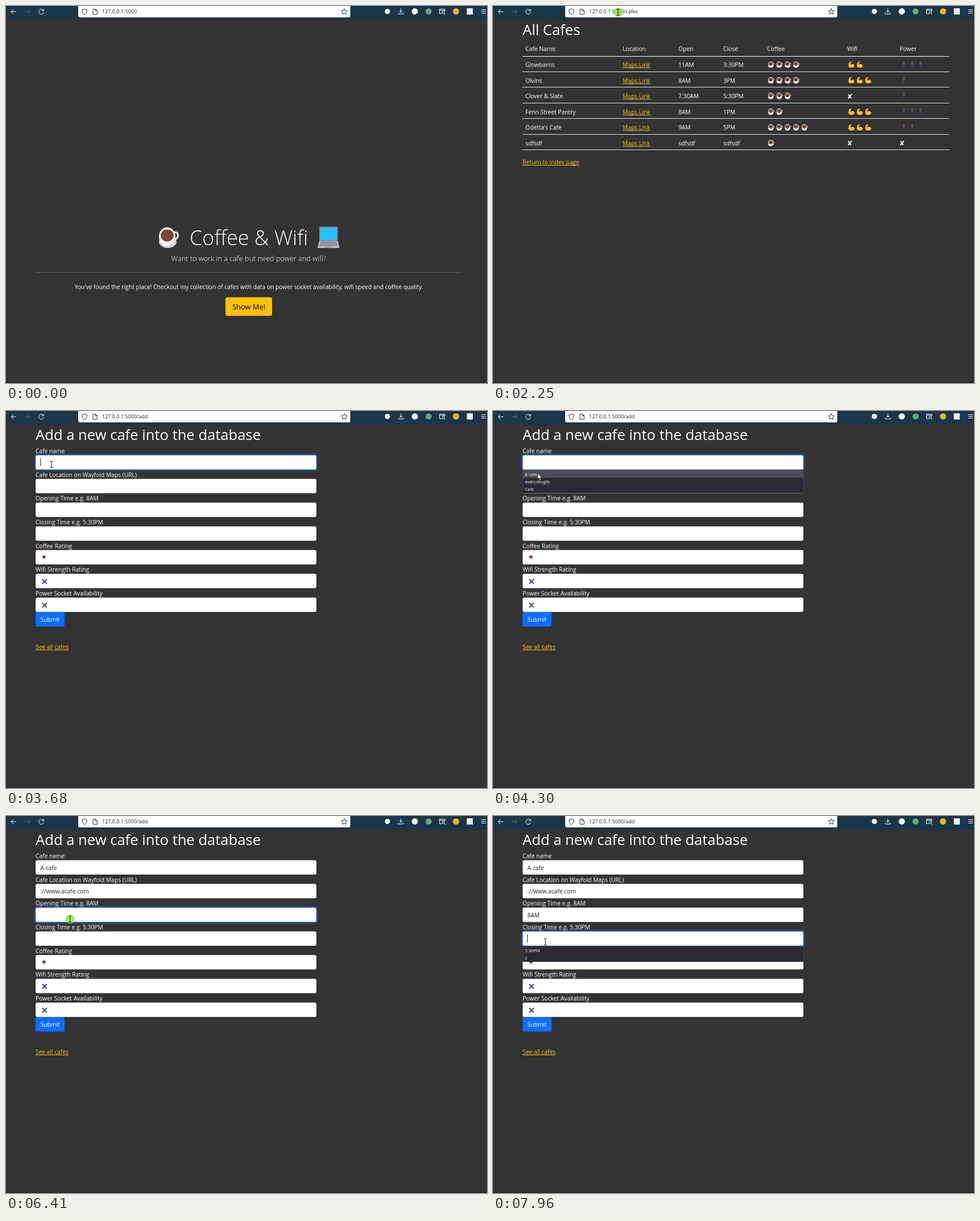
Write an HTML page with a canvas that moves like this. It is 846 px wide and 662 px high and loops after 8000 ms.

```html
<!DOCTYPE html>
<html lang="en">
<head>
<meta charset="utf-8">
<title>Coffee &amp; Wifi</title>
<style>
html, body { margin: 0; overflow: hidden; background: #333; }
canvas { display: block; }
</style>
</head>
<body>
<canvas id="stage" width="846" height="662"></canvas>
<script>
const ctx = document.getElementById('stage').getContext('2d');
const LOOP = 8000, BODY = 10.25, GOLD = '#ffc107';
const ITEM = 13.4, FIELD_HEIGHT = 25.5;
const PRESS = 80, HALO = 150, BLINK = 500;
const CAFES_AT = 870, ADD_AT = 2380;

// Each pointer move eases from the last place: start, end, x, y
const MOVES = [
  [190, 720, 451, 540],
  [1140, 1910, 292, 16],
  [1910, 2140, 220, 11],
  [3050, 3480, 80, 94],
  [3960, 4240, 78.5, 109.5],
  [4970, 5030, 82, 130],
  [5190, 5330, 101, 173],
  [5940, 6140, 113, 181],
  [6340, 7050, 98.5, 191.5],
  [7170, 7500, 92, 221]
];
// focus, open and pick are the times of clicks
const FIELDS = [
  { label: 'Cafe name', value: 'A cafe', focus: 3500, open: 3960, pick: 4500,
    items: ['A cafe', 'asdccdsvgfb', 'Cafe'] },
  { label: 'Cafe Location on Wayfold Maps (URL)', value: '://www.acafe.com', focus: 5030, open: 5110, pick: 5330,
    items: ['https://', 'sdfsdf', '://www.acafe.com', 'asdccd', 'www.cafe', 'dsvgfb', 'cafe'] },
  { label: 'Opening Time e.g. 8AM', value: '8AM', focus: 5590, open: 6340, pick: 7090, items: ['8AM', '6'] },
  { label: 'Closing Time e.g. 5:30PM', focus: 7570, open: 7780, pick: LOOP, items: ['5:30PM', '2'] },
  { label: 'Coffee Rating' }, { label: 'Wifi Strength Rating' }, { label: 'Power Socket Availability' }
];
FIELDS.forEach((field, i) => field.top = 77.4 + 41.68 * i);
const INPUTS = FIELDS.filter(field => field.items);
const CLICKS = [730, 2140, ...INPUTS.flatMap(({ focus, open, pick }) => [focus, open, pick])];
// Name, open, close, coffee, wifi, power
const CAFES = [
  ['Glowbarns', '11AM', '3:30PM', 4, 2, 3],
  ['Olvins', '8AM', '3PM', 4, 3, 1],
  ['Clover & Slate', '7:30AM', '5:30PM', 3, 0, 1],
  ['Fenn Street Pantry', '8AM', '1PM', 2, 3, 3],
  ["Odetta's Cafe", '9AM', '5PM', 5, 3, 2],
  ['sdfsdf', 'sdfsdf', 'sdfsdf', 1, 0, 0]
];

const clickedWithin = (t, span) => CLICKS.some(click => t >= click && t < click + span);
const isOpen = (field, t) => t >= field.open + PRESS && t < field.pick + PRESS;
const focusedField = t => INPUTS.findLast(field => t >= field.focus);

function text(str, x, y, size = BODY, color = '#fff', weight = 400, align = 'left') {
  ctx.font = `${weight} ${size}px "Open Sans", "Noto Sans", sans-serif`;
  ctx.textAlign = align;
  ctx.fillStyle = color;
  ctx.fillText(str, x, y);
  return ctx.measureText(str).width;
}
function link(str, x, y) {
  const width = text(str, x, y, BODY, GOLD);
  ctx.fillRect(x, Math.round(y + 1), width, 1);
}
function rect(x, y, w, h, color, r = 0) {
  ctx.fillStyle = color;
  ctx.beginPath();
  ctx.roundRect(x, y, w, h, r);
  ctx.fill();
}
function oval(x, y, rx, ry, color) {
  ctx.fillStyle = color;
  ctx.beginPath();
  ctx.ellipse(x, y, rx, ry, 0, 0, 7);
  ctx.fill();
}
function line(d, color = '#fbfbfe', width = 1) {
  ctx.strokeStyle = color;
  ctx.lineWidth = width;
  ctx.stroke(new Path2D(d));
}
function at(x, y, scale, draw) {
  ctx.save();
  ctx.translate(x, y);
  ctx.scale(scale, scale);
  draw();
  ctx.restore();
}

const cup = (x, y, scale) => at(x, y, scale, () => {
  oval(-2, 7, 15.5, 11, '#d0d0d4');
  line('M9 -10C18 -11 19 0 9 4', '#f1f1f1', 3);
  oval(-3, -2, 14.5, 16.5, '#f5f5f5');
  oval(-3, -4, 11.5, 10.5, '#7b4631');
});
const arm = (x, y) => at(x - 5.5, y - 5.5, 1, () => {
  ctx.fillStyle = '#fdbb2f';
  ctx.fill(new Path2D('M.4 9C-.2 6 1 2 2 .5L5 0 5.4 2 3.7 3 3.9 5.6C6 3.6 9.3 4 10.6 7 11.2 9.4 9 10.8 6 10.8 3.5 10.8 1.5 10.5.4 9Z'));
});
const plug = (x, y) => at(x, y, 1, () => {
  line('M-1 -5.5V-3M1 -5.5V-3', '#b5793a');
  rect(-1.8, -3.2, 3.6, 4, '#60408e', 1);
  line('M0 .5V5', '#503578', 1.3);
});
const cross = (x, y) => line(`M${x - 4} ${y - 4}l8 8m0 -8l-8 8`, '#4a50a4', 2.3);

function laptop() {
  rect(551, 387.5, 32.5, 25, '#8b83a8', 1.5);
  rect(553, 389.5, 28.5, 21.5, '#1fc3fb');
  ctx.fillStyle = '#b9b9c2';
  ctx.fill(new Path2D('M551 412.5H583.5L586.5 423.5Q586.5 425 585 425H549.5Q548 425 548 423.5Z'));
  line('M553 414.8H581.5M552.3 417.4H582.3M551.6 420H583', '#6e6e7a', 1.4);
  rect(561, 421.6, 12, 2.4, '#8e8e99');
}

function browser(url) {
  rect(0, 0, 846, 23, '#1a364a');
  rect(0, 23, 846, 1, '#23303a');
  rect(0, 659, 846, 3, '#2f2a2c');
  rect(127, -4, 478.5, 24, '#fff', 3);
  line('M18 10H9M13 6L9 10L13 14');
  line('M33 10H42M38 6L42 10L38 14', '#5f7381');
  line('M65.5 7.5A4.4 4.4 0 1 0 66.3 11M66.3 5V8.3H63');
  line('M138 5.2L142.3 6.7C142.4 11 141 13.6 138 15C135 13.6 133.6 11 133.7 6.7Z', '#333');
  line('M153 5.5H157.5L160.3 8.3V14.5H153ZM157.3 5.5V8.5H160.3', '#333');
  text(url, 169, 13.4, 9, '#2b2b30');
  line('M595 4.6L596.6 8 600.2 8.4 597.5 10.9 598.2 14.5 595 12.7 591.8 14.5 592.5 10.9 589.8 8.4 593.4 8Z', '#333');
  oval(670.8, 9.6, 4.6, 4.6, '#f4f6f8');
  line('M694.5 4.5V11M691.5 8.3L694.5 11.2 697.5 8.3M690.2 11.5V14H698.8V11.5');
  oval(719, 9.5, 5.4, 5.4, '#fff');
  oval(743.3, 9.5, 5.3, 5.3, '#68b06c');
  line('M772 9V5.5H762.5V13.5H767M762.5 7.6H772M770 13L772.5 15.2M767.2 11A2 2 0 1 0 771.2 11A2 2 0 1 0 767.2 11');
  oval(791.5, 9.5, 5.5, 5.5, '#eeb021');
  rect(810.5, 4, 10.5, 11, '#f2eeee');
  line('M836 6.5H844M836 9.5H844M836 12.5H844');
}

function homePage(hover) {
  const centered = (str, y, size, color, weight) => text(str, 427, y, size, color, weight, 'center');
  cup(286.5, 407, 1);
  centered('Coffee & Wifi', 420, 36, '#fff', 300);
  laptop();
  centered('Want to work in a cafe but need power and wifi?', 447.5, 12.7, '#fff', 300);
  rect(52, 467.5, 750, 1, '#666');
  centered("You've found the right place! Checkout my collection of cafes with data on power socket availability, wifi speed and coffee quality.",
    497.3, BODY);
  rect(386, 511.5, 82, 32.5, hover ? '#ffca2c' : GOLD, 3.3);
  centered('Show Me!', 533.3, 12.9, '#000');
}

function rating(count, x, y, icon) {
  if (!count) {
    ctx.font = '12px "DejaVu Sans", sans-serif';
    ctx.fillStyle = '#fff';
    ctx.fillText('✘', x - 8, y + 4.5);
  }
  for (let i = 0; i < count; i++) icon(x + 14.75 * i, y, .31);
}

function cafesPage() {
  const columns = [57, 228, 326, 405, 482, 623, 715];
  text('All Cafes', 52, 51, 25.6);
  ['Cafe Name', 'Location', 'Open', 'Close', 'Coffee', 'Wifi', 'Power']
    .forEach((head, i) => text(head, columns[i], 79.4));
  rect(52, 88, 750, 1, '#fff');
  CAFES.forEach(([name, open, close, coffee, wifi, power], i) => {
    const y = 103 + 27.55 * i;
    text(name, 57, y + 4);
    link('Maps Link', 228, y + 4);
    text(open, 326, y + 4);
    text(close, 405, y + 4);
    rating(coffee, 489.3, y, cup);
    rating(wifi, 630.5, y, arm);
    rating(power, 722.5, y, plug);
    rect(52, Math.floor(y + 12.2), 750, 1, '#dee2e6');
  });
  link('Return to index page', 52, 277.6);
}

function addPage(t, pointer) {
  const active = focusedField(t);
  text('Add a new cafe into the database', 52, 51, 25.6);
  for (const field of FIELDS) {
    const { label, value, top, focus, pick } = field, focused = field === active;
    text(label, 52, top - 3.4);
    if (focused) rect(49.3, top - 2.7, 499.4, 30.9, 'rgba(13,110,253,.4)', 5);
    rect(52, top, 494, FIELD_HEIGHT, focused ? '#86b7fe' : '#ced4da', 3);
    rect(52.7, top + .7, 492.6, FIELD_HEIGHT - 1.4, '#fff', 2.5);
    const filled = value && t >= pick + PRESS;
    const width = filled ? text(value, 60.5, top + 17.3, BODY, '#212529') : 0;
    if (focused && (t - focus) % (2 * BLINK) < BLINK) rect(Math.round(60 + width), Math.round(top + 6), 1, 14, '#212529');
  }
  cup(67.5, 257.2, .25);
  cross(67.8, 299.3);
  cross(67.8, 341);
  rect(52, 353, 51, 25.5, '#0d6efd', 3);
  text('Submit', 60.5, 370.4);
  link('See all cafes', 52, 418);
  if (active && isOpen(active, t)) dropdown(active, pointer, t >= active.pick);
}

function dropdown({ items, top: fieldTop }, pointer, pressing) {
  const top = fieldTop + FIELD_HEIGHT + .3, height = items.length * ITEM;
  const hover = Math.floor((pointer.y - top) / ITEM);
  rect(52, top, 494.5, height + 1.2, '#5e5d68');
  rect(52.6, top + .6, 493.3, height, '#2b2a33');
  items.forEach((item, i) => {
    const y = top + .6 + ITEM * i, pressed = i === hover && pressing;
    if (i === hover) rect(52.6, y, 493.3, ITEM, pressed ? '#00ddff' : '#4d4c56');
    text(item, 56, y + 9.7, 7.7, pressed ? '#2b2a33' : '#fbfbfe');
  });
}

function pointerAt(t) {
  let x = 446, y = 655;
  for (const [start, end, toX, toY] of MOVES) {
    const k = Math.min(1, Math.max(0, (t - start) / (end - start))), ease = k * k * (3 - 2 * k);
    x += (toX - x) * ease;
    y += (toY - y) * ease;
  }
  return { x, y };
}

function pointerKind(t, page, { x, y }) {
  if (y < 20) return 'beam';
  if (page === 'home') return x > 386 && x < 468 && y > 511 && y < 544 ? 'hand' : 'arrow';
  if (page === 'cafes') return 'arrow';
  const active = focusedField(t);
  const overList = active && isOpen(active, t) && y > active.top + FIELD_HEIGHT;
  const overField = FIELDS.some(({ top }) => y > top && y < top + FIELD_HEIGHT);
  return overField && !overList ? 'beam' : 'arrow';
}

function drawPointer({ x, y }, kind) {
  at(x, y, 1, () => {
    if (kind === 'beam') return line('M-2.5 -5.5H-.6L0 -5 .6 -5.5H2.5M0 -5V5M-2.5 5.5H-.6L0 5 .6 5.5H2.5', '#111');
    const d = kind === 'hand'
      ? 'M-1 0Q0 -1 1 0V4L5.5 5Q6.5 5.5 6.3 7L5.3 11H-.8L-4 7Q-3.5 5.5 -1 7Z'
      : 'M0 0V10.3L2.4 8.1 4.1 11.9 5.8 11.2 4.1 7.5H7.3Z';
    ctx.fillStyle = '#fff';
    ctx.fill(new Path2D(d));
    line(d, '#111', .6);
  });
}

function draw(t) {
  const page = t < CAFES_AT ? 'home' : t < ADD_AT ? 'cafes' : 'add';
  const pointer = pointerAt(t), kind = pointerKind(t, page, pointer);
  const shown = t >= MOVES[0][0];
  rect(0, 0, 846, 662, '#333');
  browser('127.0.0.1:5000' + (page === 'home' ? '' : '/' + page));
  if (page === 'home') homePage(kind === 'hand');
  else if (page === 'cafes') cafesPage();
  else addPage(t, pointer);
  if (clickedWithin(t, HALO)) oval(pointer.x, pointer.y, 8, 8, 'rgba(130,230,50,.75)');
  if (shown) drawPointer(pointer, kind);
}

const start = performance.now();
function tick() {
  draw((performance.now() - start) % LOOP);
  requestAnimationFrame(tick);
}
tick();
</script>
</body>
</html>
```
